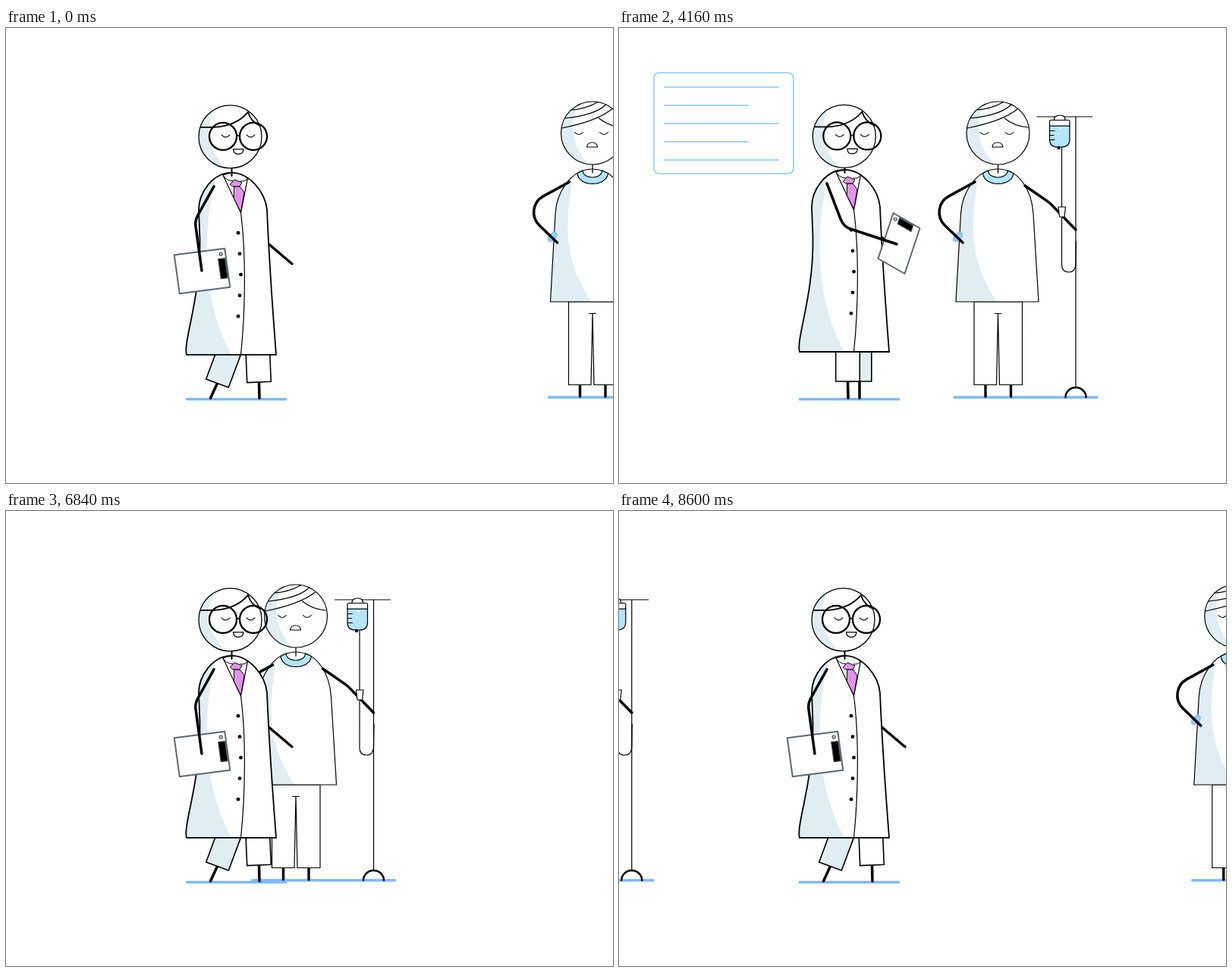
Animation, 800 px wide and 600 px high, one loop 8640 ms. Source, as an HTML page with a canvas:

```html
<!DOCTYPE html>
<html lang="en">
<head>
<meta charset="utf-8">
<title>Ward round</title>
<style>
  html, body { margin: 0; width: 100%; height: 100%; overflow: hidden; background: #fff; }
  canvas { display: block; }
</style>
</head>
<body>
<canvas id="stage" width="800" height="600"></canvas>
<script>
const ctx = document.getElementById('stage').getContext('2d');
const LOOP = 8640, STRIDE = 1760 / 3;
const INK = '#000', SHADE = '#e0eef3', FLUID = '#b3e5fc', GROUND = '#7db9fb', BUBBLE = '#a6d3fb';

const lerp = (a, b, k) => a + (b - a) * k;
const mix = (a, b, k) => a.map((v, i) => lerp(v, b[i], k));
const ramp = (t, a, b) => Math.min(1, Math.max(0, (t - a) / (b - a)));
const ease = (t, a, b) => (1 - Math.cos(Math.PI * ramp(t, a, b))) / 2;

// Value of a track of [time, value] pairs, linear between them.
function track(keys, t) {
  let i = 1;
  while (i < keys.length - 1 && t > keys[i][0]) i++;
  const [a, b] = [keys[i - 1], keys[i]];
  return lerp(a[1], b[1], ramp(t, a[0], b[0]));
}

function stroke(d, width = 1.2, color = INK) {
  ctx.lineWidth = width;
  ctx.strokeStyle = color;
  ctx.stroke(new Path2D(d));
}

function shape(d, fill = '#fff', width = 1.2, color = INK) {
  ctx.fillStyle = fill;
  ctx.fill(new Path2D(d));
  if (width) stroke(d, width, color);
}

function dot(x, y, r, color = INK) {
  ctx.fillStyle = color;
  ctx.beginPath();
  ctx.arc(x, y, r, 0, 7);
  ctx.fill();
}

function ring(x, y, r, width) {
  ctx.lineWidth = width;
  ctx.strokeStyle = INK;
  ctx.beginPath();
  ctx.arc(x, y, r, 0, 7);
  ctx.stroke();
}

function limb(x0, y0, ex, ey, x1, y1, radius, width = 3.5) {
  ctx.lineWidth = width;
  ctx.strokeStyle = INK;
  ctx.beginPath();
  ctx.moveTo(x0, y0);
  ctx.arcTo(ex, ey, x1, y1, radius);
  ctx.lineTo(x1, y1);
  ctx.stroke();
}

// White body with the shaded part clipped to its outline.
function shadedBody(outline, shadow, width) {
  const path = new Path2D(outline);
  ctx.save();
  ctx.fillStyle = '#fff';
  ctx.fill(path);
  ctx.clip(path);
  shape(shadow, SHADE, 0);
  ctx.restore();
  stroke(outline, width);
}

const circlePath = (x, y, r) =>
  `M${x - r},${y}a${r},${r} 0 1 1 ${2 * r},0a${r},${r} 0 1 1 ${-2 * r},0Z`;

/* ---------- patient ---------- */

// elbow, hand, elbow radius, wristband
const ARM_BENT = [406, 237.5, 453, 283, 24, 446.5, 275.5];
const ARM_OUT = [433, 223, 400, 273, 34, 405, 264.5];

function drip() {
  stroke('M551,117H624M602,117V474');
  stroke('M588.5,487a13.5,13 0 0 1 27,0', 2.5);
  stroke('M602.5,281L602,312Q601,322 593,322Q583.5,322 583.5,312V157');
  shape('M573.5,122Q573,115 581,115Q588.5,115 588,122Z');
  shape('M567.5,129H594V147Q594,157 583,157H578Q567.5,157 567.5,147Z', FLUID);
  shape('M569,121.5H592.5Q594,121.5 594,123V129H567.5V123Q567.5,121.5 569,121.5Z');
  stroke('M568,135.5h6M568,141.5h5M568,147.5h6');
  dot(582, 132, 1.5, '#fff');
  dot(579.5, 140, 1.2, '#fff');
  dot(579.5, 158, 2.2);
}

function patient(offset, reach) {
  ctx.save();
  ctx.translate(offset, 0);
  stroke('M442,487H630', 3.5, GROUND);
  drip();
  stroke('M483,471V486M516.5,471V486', 3.4);
  shape('M468,361H531.5V470.5H501.5L499.5,376L497.5,470.5H468Z');
  stroke('M495,376.5H504');

  shadedBody(
    'M444,361L450.5,245C452,218 470,186 499.5,186C528,186 544,215 546,245L553,361Z',
    'M476,186C459,270 466,312 498,361H440V186Z', 1.2);
  shape('M479.5,191.5C481,210 518,210 520,191.5L512,188C512,200 487,200 486.5,188Z', FLUID);
  stroke('M499.5,180V191', 1.3);

  shadedBody(circlePath(499.5, 138.5, 41.5), 'M483,95C467,125 472,158 497,182H450V95Z', 1.2);
  stroke('M471,108Q490,107 506,98M463,119Q503,115 517,101M459,132Q505,123 525,107M508,119Q522,130 539,131');
  stroke('M476,137.5q5.5,6 11,0M509,137.5q5.5,6 11,0', 1.1);
  shape('M492,157Q492.5,151 499,151Q505.5,151 506,157Z');

  limb(535, 208, 567, 230, 602, 266, 30);
  shape('M579,236H588.5L587,249H580.5Z');

  const [ex, ey, hx, hy, radius, wx, wy] = mix(ARM_BENT, ARM_OUT, reach);
  ctx.save();
  ctx.translate(wx, wy);
  ctx.rotate(Math.atan2(hy - ey, hx - ex));
  shape('M0,-6.5C5,-6.5 4,6.5 0,6.5C-5,6.5 -4,-6.5 0,-6.5Z', BUBBLE, 3, '#8cc4fb');
  ctx.restore();
  limb(469, 203, ex, ey, hx, hy, radius);
  ctx.restore();
}

/* ---------- doctor ---------- */

// elbow, hand, clipboard centre, its long side and its short side
const BACK = [249, 250, 258, 316, 258.5, 316.5, 66.5, -8.5, 7, 51];
const FRONT = [273, 262, 325, 308, 325.5, 308.5, 56, -36.5, 27, 41.5];
const HOLD = [296, 262, 369, 289, 371.5, 288.5, 17.5, -61.5, 33, 19];
const READ = [296, 262, 366, 285, 369, 284, 20, -60, 35, 20];
const TURN = [294, 262, 363, 291, 369, 291, 32, -56, 39.5, 25.5];

// phase, then hip x, ankle x, foot x, ankle y, foot y
const STEPS = [
  [0, 332, 333.5, 334, 467, 488],
  [0.295, 303, 300.5, 298, 464, 487],
  [0.5, 292.5, 278.5, 269.5, 468.5, 488],
  [0.795, 319, 314.5, 310.5, 460.5, 480],
  [1, 332, 333.5, 334, 467, 488]
];

function legPose(phase) {
  const p = phase - Math.floor(phase);
  const i = STEPS.findIndex((s, n) => n && p <= s[0]);
  const a = STEPS[i - 1], b = STEPS[i];
  return mix(a, b, ease(p, a[0], b[0])).slice(1);
}

function leg([hip, ankle, foot, ankleY, footY], hem, fill) {
  stroke(`M${ankle},${ankleY}L${foot},${footY}`, 3.5);
  const dx = ankle - hip, dy = ankleY - hem, len = Math.hypot(dx, dy);
  const nx = dy / len * 15.8, ny = -dx / len * 15.8;
  const x = hip - dx * 0.4, y = hem - dy * 0.4;
  shape(`M${x - nx},${y - ny}L${x + nx},${y + ny}L${ankle + nx},${ankleY + ny}L${ankle - nx},${ankleY - ny}Z`, fill, 1.6);
}

function clipboard([, , , , cx, cy, ux, uy, vx, vy]) {
  const at = (a, b) => [cx + ux * a + vx * b, cy + uy * a + vy * b];
  const quad = (a0, a1, b0, b1) =>
    'M' + [at(a0, b0), at(a1, b0), at(a1, b1), at(a0, b1)].join('L') + 'Z';
  ctx.lineJoin = 'round';
  shape(quad(-0.5, 0.5, -0.5, 0.5), '#fff', 2, '#5d6874');
  shape(quad(0.345, 0.48, -0.25, 0.26), INK, 1.2, '#4a525b');
  const [x, y] = at(0.41, -0.37);
  shape(circlePath(x, y, 2), '#cfd6dc', 1.2, '#4a525b');
  ctx.lineJoin = 'miter';
}

function coat() {
  shadedBody(
    'M238,427C233,410 257,352 255.5,275L254,236C254,214 272,187 297,187C322,187 342,214 344,236Q347,310 356,427Z',
    'M277,187C258,270 258,355 297,427H230V187Z', 1.8);
  shape('M286,190L309.5,240L318.5,194Q303,183 286,190Z');
  stroke('M286,190Q289,197 299,198M318.5,194Q316,199 309,198', 1);
  shape('M301,205H308L314,213L309.5,239L300.5,221Z', '#e193e8', 1);
  shape('M295.5,202L301,196L311,200L308,205H299Z', '#e193e8', 1);
  stroke('M309.5,240C316,290 316,365 309.5,427');
  [306, 308, 309.5, 308, 306].forEach((x, i) => dot(x, 266.3 + i * 27.5, 2.4));
  stroke('M297.5,181V191', 2);
}

function head() {
  shadedBody(circlePath(295.5, 139.5, 41.5), 'M279,95C262,125 262,152 291,183H245V95Z', 1.3);
  stroke('M257,127H275Q304,125 319,107Q323,120 335,125', 1.8);
  ring(286, 139, 18, 2.3);
  ring(326, 139, 18, 2.3);
  stroke('M304,138.5Q306,137 308,138.5', 1.6);
  stroke('M284,137q5.5,6 11,0M317,137q5.5,6 11,0', 1.1);
  shape('M299.5,156H313Q312.5,162.5 306,162.5Q300,162.5 299.5,156Z');
}

function doctor(t) {
  const phase = (t < 3000 ? t : t - 6840) / STRIDE;
  const swing = Math.cos(phase * 2 * Math.PI);
  const walk = t < 3000 ? 1 - ease(t, 920, 1300) : ease(t, 5720, 6250);
  const bob = (4.3 * swing * swing - 0.4) * walk;
  const sway = (1 - swing) / 2 / 0.955;

  const pace = mix(BACK, FRONT, sway);
  let pose;
  if (t < 2600) pose = mix(pace, HOLD, ease(t, 940, 1560));
  else if (t < 4500) pose = mix(HOLD, READ, ease(t, 2680, 3200));
  else if (t < 5300) pose = mix(READ, HOLD, ease(t, 4880, 5300));
  else if (t < 5600) pose = mix(HOLD, TURN, ramp(t, 5300, 5600));
  else pose = mix(TURN, pace, ramp(t, 5600, 6250));

  const inset = 9 * (1 - swing * swing) * walk;
  stroke(`M${238.5 + inset},489.5H${368.5 - inset}`, 3.5, GROUND);

  const [farX, farY] = mix([358, 284], [lerp(377, 325, sway), 311], walk);
  stroke(`M318,${257 + bob}L${farX},${farY}`, 3.3);

  leg(mix([317, 317, 317, 466, 488], legPose(phase + 0.5), walk), 427 + bob, SHADE);
  leg(mix([301.5, 301.5, 302, 466, 488], legPose(phase), walk), 427 + bob, '#fff');

  ctx.save();
  ctx.translate(0, bob);
  coat();
  ctx.save();
  const nod = Math.sin(ramp(t, 4000, 4840) * 2 * Math.PI) ** 2;
  ctx.translate(1.5 * nod, 4 * nod);
  head();
  ctx.restore();
  clipboard(pose);
  limb(274, 205, pose[0], pose[1], pose[2], pose[3], 22);
  ctx.restore();
}

/* ---------- callouts ---------- */

function grown(x, y, k, draw) {
  if (k <= 0) return;
  ctx.save();
  ctx.translate(x, y);
  ctx.scale(k, k);
  ctx.translate(-x, -y);
  ctx.globalAlpha = k;
  draw();
  ctx.restore();
}

function wristBubble() {
  ctx.setLineDash([5, 4]);
  stroke('M366,220L402,259M427,212L414,259', 1.6, BUBBLE);
  ctx.setLineDash([]);
  shape('M352.5,197.3a39.3,29.6 0 1 1 78.6,0a39.3,29.6 0 1 1 -78.6,0Z', '#fff', 2, BUBBLE);
}

function panel(t) {
  shape('M54,59H222Q230,59 230,67V184Q230,192 222,192H54Q46,192 46,184V67Q46,59 54,59Z', '#fff', 2, BUBBLE);
  const k = ease(t, 3540, 3840);
  if (!k) return;
  for (let i = 0; i < 5; i++) {
    stroke(`M60,${78 + i * 24}h${(i % 2 ? 110 : 150) * k}`, 2, BUBBLE);
  }
}

/* ---------- scene ---------- */

const ENTER = [[0, 273.5], [880, 40], [1040, 0]];
const LEAVE = [[6360, 0], [6600, -57.5], [6840, -117.5], [7480, -279], [7600, -316.5], [8600, -585.2], [8640, -596]];

function frame(now) {
  const t = now % LOOP;
  ctx.fillStyle = '#fff';
  ctx.fillRect(0, 0, 800, 600);
  ctx.lineCap = 'round';

  const offset = track(t < 3000 ? ENTER : LEAVE, t);
  const reach = ease(t, 1080, 1660) - ease(t, 2800, 3400);
  patient(offset, reach);
  if (t > 8370) patient(offset + 899, 0);
  doctor(t);
  grown(405, 264, ease(t, 1780, 2160) - ease(t, 2660, 2960), wristBubble);
  grown(138, 125.5, ease(t, 3000, 3480) - ease(t, 4880, 5300), () => panel(t));

  requestAnimationFrame(tick);
}

let start;
function tick(now) {
  start ??= now;
  frame(now - start);
}
requestAnimationFrame(tick);
</script>
</body>
</html>
```
